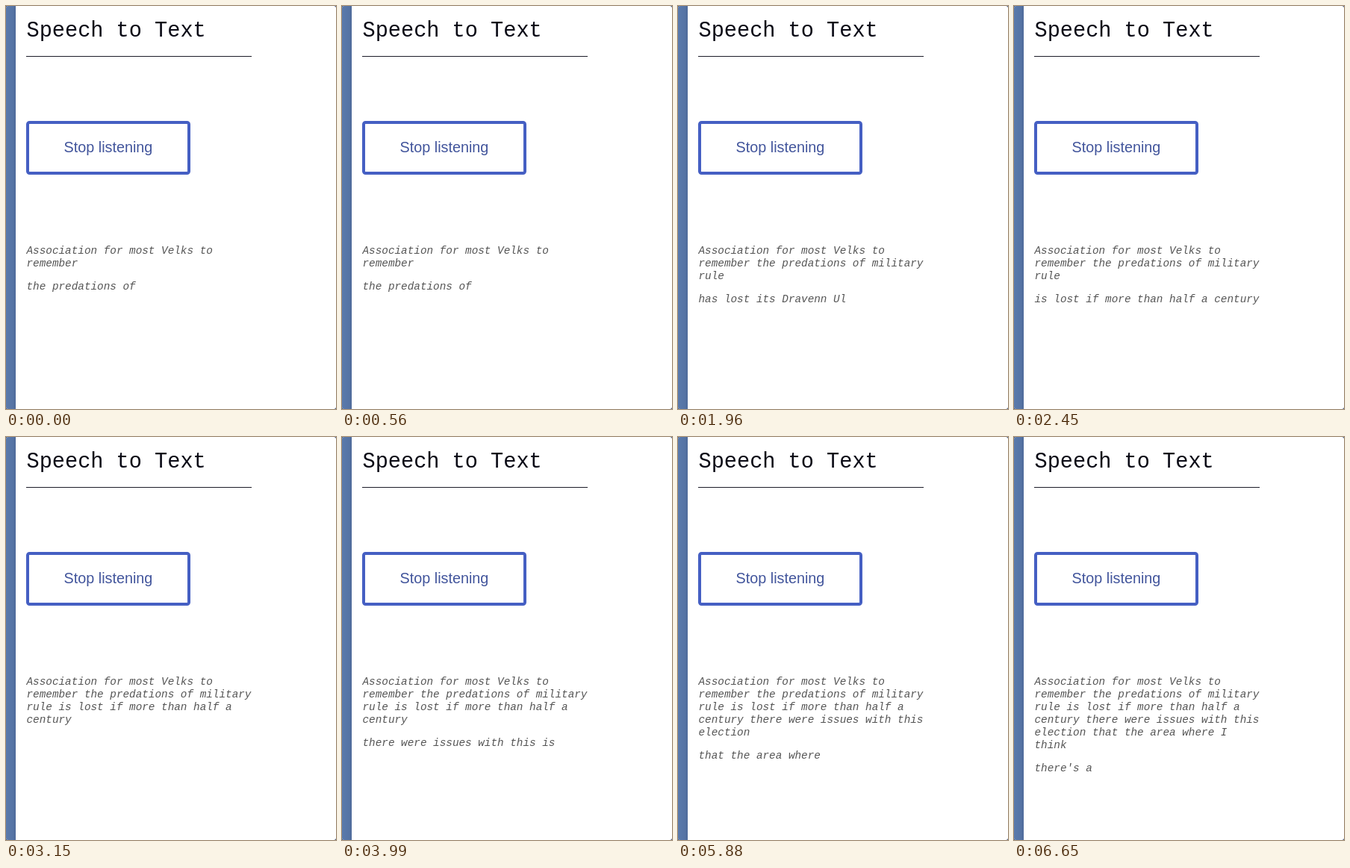
Write an HTML page that moves like this. It is 442 px wide and 540 px high and loops after 6.72 s.

```html
<!DOCTYPE html>
<html lang="en">
<head>
<meta charset="utf-8">
<title>Speech to Text</title>
<style>
  html, body { margin: 0; width: 100%; height: 100%; overflow: hidden; background: #34476b; }
  #page { position: absolute; inset: 0; background: #fff; border-radius: 3px; overflow: hidden; }
  svg { position: absolute; left: 0; top: 0; }
  #transcript {
    position: absolute; left: 27.5px; top: 320px; width: 304px;
    font: italic 14.33px/17px "Liberation Mono", "Courier New", monospace;
    color: #555;
  }
  p { margin: 0 0 14px; }
</style>
</head>
<body>
<div id="page">
  <svg width="442" height="540" viewBox="0 0 442 540">
    <defs>
      <linearGradient id="edge">
        <stop offset="0" stop-color="#5a7aac"/>
        <stop offset=".7" stop-color="#5674a5"/>
        <stop offset="1" stop-color="#4e6a99"/>
      </linearGradient>
    </defs>
    <rect width="13" height="540" fill="url(#edge)"/>
    <text x="27.5" y="41" font-family="'Liberation Mono', 'Courier New', monospace" font-size="28.6" fill="#0b0b16">Speech to Text</text>
    <rect x="27" y="67" width="302" height="1" fill="#1c1c28"/>
    <rect x="29" y="156" width="216" height="68" rx="2.5" fill="#fff" stroke="#455fc3" stroke-width="4"/>
    <text x="137" y="196" text-anchor="middle" font-family="'Liberation Sans', Arial, sans-serif" font-size="19.8" fill="#42559c">Stop listening</text>
    <path id="cursor" d="M0 0V14.5L3.3 11.4L5.4 16.4L8 15.3L5.9 10.4H10.3Z" fill="#000" stroke="#fff" stroke-width="1"/>
  </svg>
  <div id="transcript"><p id="settled"></p><p id="interim"></p></div>
</div>
<script>
  const LOOP = 6720, STEP = 70;
  const byId = id => document.getElementById(id);

  // Phrases recognised for good, each with the time it is appended.
  const settledPhrases = [
    [0, "Association for most Velks to remember"],
    [1050, "the predations of military rule"],
    [2800, "is lost if more than half a century"],
    [4830, "there were issues with this election"],
    [6230, "that the area where I think"],
  ];

  // Current guess for the phrase being spoken.
  const guesses = [
    [0, "the predations of"],
    [910, "the predations of military"],
    [1050, ""],
    [1120, "is"],
    [1190, "is lost"],
    [1260, "is lost if"],
    [1610, "has lost its"],
    [1750, "has lost its Dravenn"],
    [1890, "has lost its Dravenn Ul"],
    [2170, "has lost its more than half of"],
    [2380, "is lost if more than half a century"],
    [2800, ""],
    [3360, "there"],
    [3430, "there were"],
    [3570, "there were issues with"],
    [3780, "there were issues with this"],
    [3920, "there were issues with this is"],
    [4200, "there were issues with this"],
    [4830, ""],
    [4900, "that they"],
    [5180, "that the"],
    [5530, "that the area"],
    [5740, "that the area where"],
    [5950, "that the area where I"],
    [6090, "that the area where I think"],
    [6230, ""],
    [6580, "there's"],
    [6650, "there's a"],
  ];

  // Pointer stops: time, x, y of the tip.
  const pointerPath = [[1050, 328, 542], [1260, 306, 474], [1400, 306, 474], [1610, 318, 542]];

  const reached = (list, t) => list.filter(([start]) => start <= t).map(item => item[1]);
  const ease = k => k * k * (3 - 2 * k);

  function pointerAt(t) {
    const next = pointerPath.findIndex(([time]) => time > t);
    if (next < 1) return [0, 600];
    const [t0, x0, y0] = pointerPath[next - 1], [t1, x1, y1] = pointerPath[next];
    const k = ease((t - t0) / (t1 - t0));
    return [x0 + (x1 - x0) * k, y0 + (y1 - y0) * k];
  }

  function setText(id, text) {
    const node = byId(id);
    if (node.textContent !== text) node.textContent = text;
  }

  function draw(now) {
    const t = Math.floor(now % LOOP / STEP) * STEP;
    setText("settled", reached(settledPhrases, t).join(" "));
    setText("interim", reached(guesses, t).pop());
    byId("cursor").setAttribute("transform", `translate(${pointerAt(t)})`);
  }

  const begin = performance.now();
  function tick() {
    draw(performance.now() - begin);
    requestAnimationFrame(tick);
  }
  tick();
</script>
</body>
</html>
```
